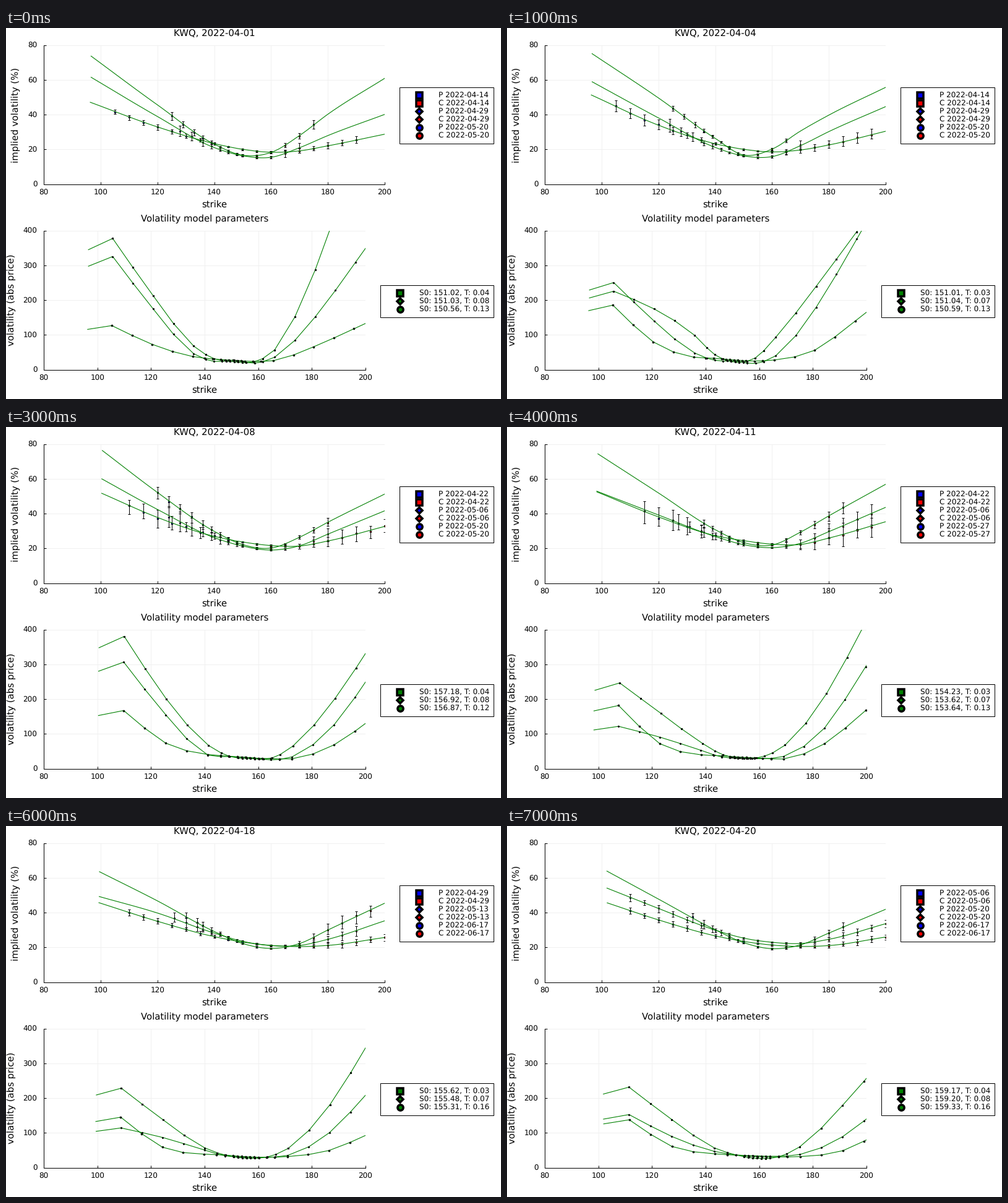
A matplotlib script that plays this animation: 800x600 px, repeating every 8 s.

```python
import numpy as np
import matplotlib.pyplot as plt
from matplotlib.animation import FuncAnimation
from matplotlib.patches import Rectangle

W, H, DPI = 800, 600, 100
PX = 72 / DPI
GREEN = "#008000"
SHAPES = "sDo"
BIG, SMALL = 14.9 * PX, 12 * PX

plt.rcParams.update({"font.family": "DejaVu Sans", "text.hinting": "none"})

LEFT = 0.64  # curves begin at this share of the spot price
KEY_STRIKES = [120, 140, 150, 160, 170, 180, 200]
KEY_KNOTS = [.7, .8, .9, .95, 1, 1.05, 1.1, 1.2, 1.3]
HALF = np.array([.01, .02, .03, .05, .07, .1, .15, .2, .25, .3])
KNOTS = np.r_[1 - HALF[::-1], 1, 1 + HALF]


def smooth(x, y, xs):
    """Cubic Hermite curve through the key points (x, y), read at xs."""
    x, y, xs = (np.asarray(v, float) for v in (x, y, xs))
    m = np.gradient(y, x)
    i = np.clip(np.searchsorted(x, xs) - 1, 0, len(x) - 2)
    h = x[i + 1] - x[i]
    t = (xs - x[i]) / h
    u = 1 - t
    return (y[i] * u * u * (1 + 2 * t) + y[i + 1] * t * t * (3 - 2 * t)
            + h * t * u * (m[i] * u - m[i + 1] * t))


class Smile:
    """One expiry: implied vol curve, model knots and market quotes."""

    def __init__(self, date, expiry, spot, vols, knots, market):
        self.expiry, self.spot = expiry, spot
        self.term = (np.datetime64(expiry) - np.datetime64(date)).astype(int) / 365
        self.vols, self.knots, self.market = map(np.array, (vols, knots, market))

    def vol(self, xs):
        return smooth([LEFT * self.spot] + KEY_STRIKES, self.vols, xs)

    def model(self):
        y = smooth(KEY_KNOTS, self.knots, KNOTS)
        x = np.r_[LEFT, KNOTS, 1.35]
        return self.spot * x, np.r_[y[0] * LEFT / .7, y, 2 * y[-1] - y[-2]]

    def quotes(self):
        """Strikes, mid vols and error bars that widen away from the spot."""
        first, last, spread = self.market
        if first < 120:
            k = np.arange(first, last + 1, 5)
        else:
            k = np.r_[np.arange(first, 136, 4), np.arange(136, 150, 3),
                      np.arange(150, last + 1, 5)]
        rng = np.random.default_rng(int(self.spot * 100))
        wing = np.clip(abs(k / self.spot - 1) - .05, 0, .15) / .15
        down, up = .5 + spread * wing * rng.uniform(.6, 1.2, (2, len(k)))
        mid = self.vol(k) + wing * rng.uniform(-.2, .2, len(k)) * spread
        return k, mid, (down, up)


days = []


def day(date):
    days.append((date, []))


def smile(*args):
    date, smiles = days[-1]
    smiles.append(Smile(date, *args))


def between(date, before, after, expiries, spots):
    """A day whose curves lie halfway between two others."""
    day(date)
    for a, b, expiry, spot in zip(before, after, expiries, spots):
        smile(expiry, spot, (a.vols + b.vols) / 2, (a.knots + b.knots) / 2,
              (a.market[0], a.market[1], (a.market[2] + b.market[2]) / 2))


# expiry, spot, vols at the key strikes, model at the key knots,
# quotes as first strike, last strike and spread
day("2022-04-01")
smile("2022-04-14", 151.02, [73.8, 45.7, 23.1, 16.7, 18.3, 28, 40.3, 61],
      [378, 213, 68, 32, 23, 23, 57, 287, 620], (125, 175, 2.5))
smile("2022-04-29", 151.03, [61.6, 39, 21.1, 16.4, 15.5, 21, 28, 40.2],
      [326, 175, 46, 24, 27, 19, 36, 152, 310], (128, 170, 5))
smile("2022-05-20", 150.56, [47.2, 33, 23.4, 20.1, 18.4, 19.2, 22.1, 28.8],
      [127, 73, 38, 31, 27, 24, 26, 66, 118], (105, 190, 1.3))

day("2022-04-04")
smile("2022-04-14", 151.01, [75.2, 49.7, 26.4, 16.8, 20.2, 30.6, 39.8, 55.8],
      [226, 175, 99, 43, 22, 34, 93, 240, 397], (125, 165, 2))
smile("2022-04-29", 151.04, [59, 38.2, 21.2, 16.3, 15.9, 22.2, 30.3, 44.7],
      [251, 140, 48, 27, 25, 18, 40, 180, 376], (124, 170, 4))
smile("2022-05-20", 150.59, [51.4, 34, 23.3, 20.1, 18.6, 19.7, 22.6, 30.5],
      [186, 80, 36, 33, 28, 25, 28, 56, 140], (105, 195, 2.5))

day("2022-04-06")
smile("2022-04-22", 155.07, [78.4, 52.6, 29, 21.1, 18.5, 23.5, 31.4, 45.7],
      [515, 242, 61, 31, 28, 25, 62, 188, 333], (120, 180, 3.5))
smile("2022-05-06", 154.61, [67.2, 45.7, 25.6, 20.6, 17.7, 20.1, 26.8, 39.7],
      [492, 219, 25, 36, 34, 22, 33, 136, 296], (124, 180, 7))
smile("2022-05-20", 154.57, [51, 37.6, 26.6, 23, 20.9, 20.5, 22.6, 30],
      [153, 75, 42, 35, 30, 28, 29, 65, 138], (110, 200, 2.5))

day("2022-04-11")
smile("2022-04-22", 154.23, [74.5, 52, 30.8, 23.4, 22, 29.4, 38.8, 57],
      [247, 159, 73, 40, 30, 36, 68, 216, 434], (136, 185, 3))
smile("2022-05-06", 153.62, [53, 39.3, 26.9, 22.2, 20.5, 23, 29.7, 43.7],
      [122, 91, 53, 34, 30, 29, 35, 117, 294], (127, 195, 5))
smile("2022-05-27", 153.64, [52.6, 38.2, 27.4, 24.5, 22.5, 22.3, 26, 35.4],
      [182, 72, 40, 37, 33, 30, 28, 72, 168], (115, 195, 6))

day("2022-04-13")
smile("2022-04-29", 157.28, [63.3, 45.8, 28.2, 21.8, 19.6, 23, 31.8, 49],
      [226, 137, 57, 35, 28, 31, 51, 184, 430], (130, 195, 4))
smile("2022-05-13", 156.78, [44.5, 37.2, 26.6, 21.7, 19.2, 20, 24.7, 37],
      [76, 84, 55, 31, 27, 27, 33, 113, 269], (126, 190, 4))
smile("2022-06-17", 156.96, [45.9, 34.3, 25.8, 22.8, 21, 20.5, 21.3, 25.5],
      [153, 57, 38, 37, 31, 29, 32, 50, 89], (110, 200, 1.4))

day("2022-04-20")
smile("2022-05-06", 159.17, [64, 47.9, 30.2, 22.8, 19.3, 21.5, 28.3, 42],
      [232, 139, 57, 37, 27, 31, 60, 179, 320], (132, 185, 3))
smile("2022-05-20", 159.20, [54.2, 42.5, 30, 25.4, 23, 22.3, 24.7, 33.7],
      [153, 90, 47, 37, 34, 33, 38, 89, 185], (110, 200, 1.5))
smile("2022-06-17", 159.33, [45.7, 35.9, 26.7, 23.5, 21.4, 20.6, 21.1, 26],
      [138, 61, 40, 36, 32, 31, 32, 49, 110], (110, 200, 1.2))

between("2022-04-08", days[2][1], days[3][1],
        ("2022-04-22", "2022-05-06", "2022-05-20"), (157.18, 156.92, 156.87))
between("2022-04-18", days[4][1], days[5][1],
        ("2022-04-29", "2022-05-13", "2022-06-17"), (155.62, 155.48, 155.31))
days.sort(key=lambda d: d[0])

fig = plt.figure(figsize=(W / DPI, H / DPI), dpi=DPI, facecolor="white")


def text(x, y, s, size=SMALL, ha="center", rotation=0):
    fig.text(x / W, 1 - y / H, s, size=size, ha=ha, va="baseline",
             rotation=rotation, rotation_mode="anchor")


def panel(right, top, bottom, ymax, step):
    left = 61
    ax = fig.add_axes([left / W, 1 - bottom / H, (right - left) / W, (bottom - top) / H])
    ax.set(xlim=(80, 200), ylim=(0, ymax), facecolor="none", axisbelow=True)
    ax.spines[["top", "right"]].set_visible(False)
    ax.spines[["left", "bottom"]].set_linewidth(PX)
    xt, yt = range(80, 201, 20), range(0, ymax + 1, step)
    ax.set_xticks(xt, [])
    ax.set_yticks(yt, [])
    ax.tick_params(direction="in", length=4 * PX, width=PX)
    ax.grid(color="#f0f0f0", lw=PX)
    for v in xt:
        text(left + (v - 80) / 120 * (right - left), bottom + 17.4, v)
    for v in yt:
        text(50.5, bottom - v / ymax * (bottom - top) + 4.3, v, ha="right")
    text((left + right) / 2, bottom + 37.4, "strike", BIG)
    return ax


def dots(ax, x, y, kind, color, z):
    size = {"s": 2.8, "D": 1.8, "o": 2.5}[SHAPES[kind]]
    ax.plot(x, y, SHAPES[kind], ms=size * PX, mfc=color, mec="k", mew=1.1 * PX, zorder=z)


def legend(ax, box, x, rows):
    x0, y0, x1, y1 = box
    ax.add_patch(Rectangle((x0, y0), x1 - x0, y1 - y0, fc="white", ec="k", lw=PX))
    for i, (kind, color, label) in enumerate(rows):
        y = y0 + 13 + 13 * i
        size = 6.4 if SHAPES[kind] == "D" else 9.2
        ax.plot(x, y, SHAPES[kind], ms=size * PX, mfc=color, mec="k", mew=3.5 * PX)
        text(x + 31, y + 4.2, label, ha="left")


def draw(i):
    fig.clear()
    date, smiles = days[i]
    page = fig.add_axes([0, 0, 1, 1])
    page.set(xlim=(0, W), ylim=(H, 0))
    page.axis("off")

    top = panel(612, 28, 252.6, 80, 20)
    low = panel(581, 328, 552.6, 400, 100)
    text(336.5, 13, "KWQ, " + date, BIG)
    text(321, 313, "Volatility model parameters", BIG)
    text(19.5, 140.5, "implied volatility (%)", BIG, rotation=90)
    text(13, 439.5, "volatility (abs price)", BIG, rotation=90)

    upper, lower = [], []
    for kind, s in enumerate(smiles):
        k, mid, err = s.quotes()
        top.errorbar(k, mid, err, fmt="none", ecolor="k", elinewidth=PX,
                     capsize=1.7 * PX, capthick=PX, zorder=2)
        for color, part, name in (("blue", k < s.spot, "P "), ("red", k >= s.spot, "C ")):
            dots(top, k[part], mid[part], kind, color, 3)
            upper.append((kind, color, name + s.expiry))
        xs = np.linspace(LEFT * s.spot, 200, 120)
        top.plot(xs, s.vol(xs), color=GREEN, lw=1.1 * PX, zorder=4)

        x, y = s.model()
        low.plot(x, y, color=GREEN, lw=1.1 * PX, zorder=2)
        dots(low, x[1:-1], y[1:-1], kind, GREEN, 3)
        lower.append((kind, GREEN, f"S0: {s.spot:.2f}, T: {s.term:.2f}"))

    legend(page, (635.6, 95.6, 787.6, 186.6), 668, upper)
    legend(page, (604.6, 415.6, 787.6, 467.6), 637, lower)
    return []


anim = FuncAnimation(fig, draw, frames=len(days), init_func=lambda: [],
                     interval=1000, repeat=True, repeat_delay=0)
plt.show()
```
